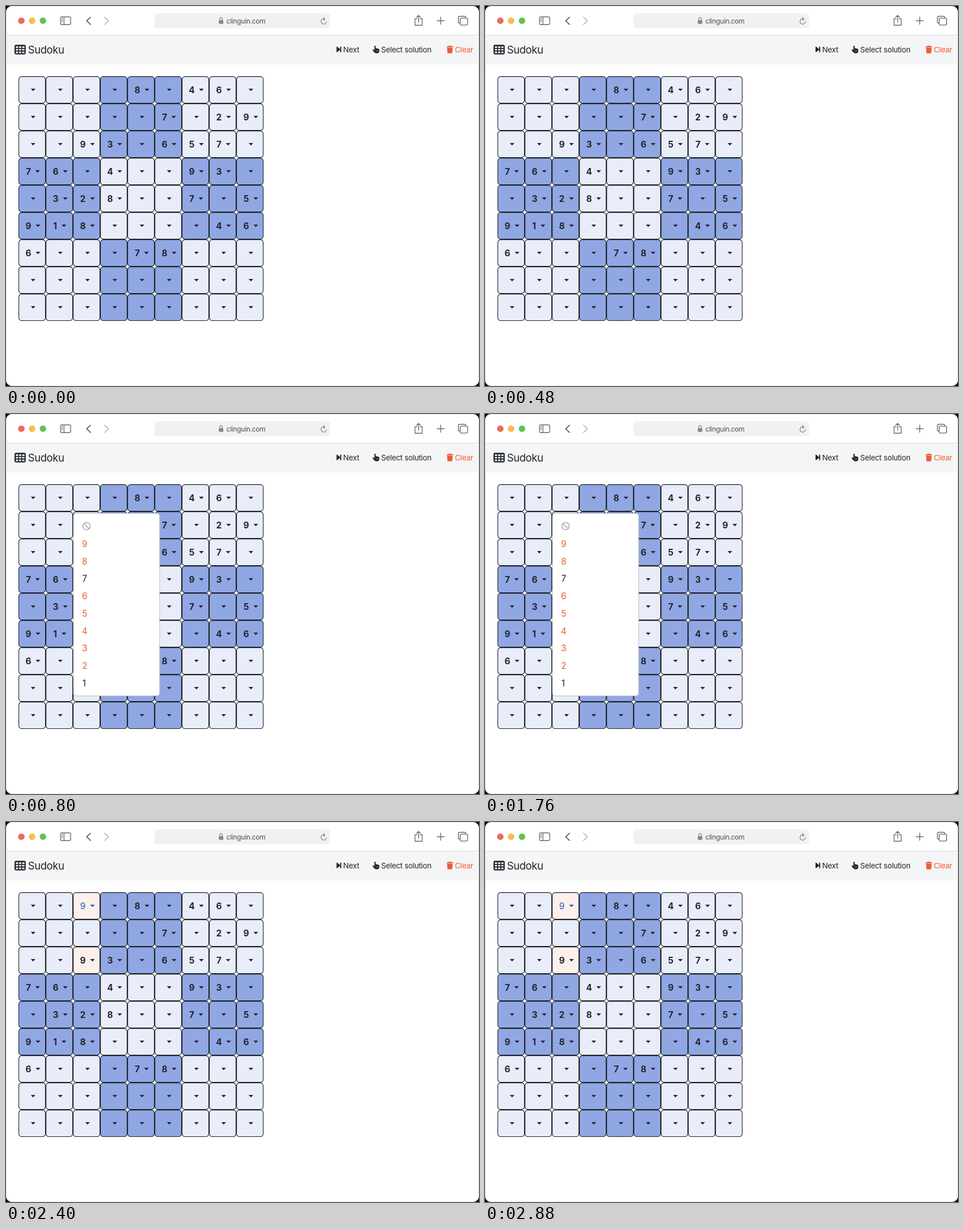
These frames come from a looping animation (834 px wide and 671 px high, 3.2 s). An HTML page:

```html
<!DOCTYPE html>
<html lang="en">
<head>
<meta charset="utf-8">
<title>Sudoku</title>
<style>
  html, body { margin: 0; width: 100%; height: 100%; overflow: hidden; background: #000; }
  svg { display: block; font-family: Inter, "Open Sans", sans-serif; fill: #212529; }
  .line { fill: none; stroke: #6b6b6b; stroke-width: 1.4; stroke-linecap: round; stroke-linejoin: round; }
  .nav { font-size: 13.3px; letter-spacing: -.25px; }
  .cell { stroke: #1b1f24; stroke-width: 1.1; }
  .digit { font-size: 15.5px; font-weight: 700; text-anchor: middle; }
  .chosen { font-weight: 400; fill: #2456c8; }
  .item { font-size: 15.3px; text-anchor: middle; }
  .red { fill: #ee5a36; }
</style>
</head>
<body>
<svg width="834" height="671" viewBox="0 0 834 671">
  <rect width="834" height="671" rx="10" fill="#d4d4d4"/>
  <rect x=".8" y=".5" width="832.4" height="670" rx="9.5" fill="#fff"/>
  <path d="M.8 51.5H833.2" stroke="#dcdddd"/>
  <path d="M.8 52H833.2V103.5H.8z" fill="#f4f5f6"/>

  <!-- browser toolbar -->
  <circle cx="27" cy="26" r="5.8" fill="#ec6a5e"/>
  <circle cx="46" cy="26" r="5.8" fill="#f4bd4f"/>
  <circle cx="65.2" cy="26" r="5.8" fill="#61c454"/>
  <g class="line">
    <rect x="96.2" y="19.2" width="17.8" height="13.6" rx="2.2"/>
    <path d="M102.4 19.2V32.8M98.4 22.3h1.8M98.4 24.8h1.8M98.4 27.3h1.8" stroke-width="1.2"/>
    <path d="M149 19.8L142.2 26.2L149 32.6" stroke="#555" stroke-width="1.6"/>
    <path d="M173.8 19.8L180.6 26.2L173.8 32.6" stroke="#b9b9b9" stroke-width="1.6"/>
    <path d="M724.5 22.5H721.2V34H733.8V22.5H730.5M727.5 28.5V16.8M724 20L727.5 16.6L731 20"/>
    <path d="M760.2 26H772.8M766.5 19.7V32.3"/>
    <path d="M800.6 30H799.6Q797.6 30 797.6 28V20.2Q797.6 18.2 799.6 18.2H808.6Q810.6 18.2 810.6 20.2V21.4"/>
    <rect x="800.8" y="21.4" width="13" height="12.2" rx="2"/>
  </g>
  <rect x="262" y="13" width="309.5" height="26.5" rx="6" fill="#f1f1f2"/>
  <rect x="375.3" y="25" width="7.8" height="6.6" rx="1" fill="#858585"/>
  <path class="line" d="M376.9 25V23Q376.9 20.4 379.2 20.4T381.5 23V25" style="stroke:#858585;stroke-width:1.2"/>
  <text x="388.6" y="30.5" font-size="12" letter-spacing="-.28" fill="#4b4b4b">clinguin.com</text>
  <path class="line" d="M562.2 23.1A4.7 4.7 0 1 0 564.8 27.3M559.8 20.5L562.4 23.1L559.8 25.5" style="stroke:#777;stroke-width:1.1"/>

  <!-- page header -->
  <rect x="15" y="68.6" width="19.8" height="16.8" rx="2.4"/>
  <path d="M17.4 71.2h4v2.8h-4zm5.6 0h4v2.8h-4zm5.6 0h4v2.8h-4zM17.4 75.8h4v2.8h-4zm5.6 0h4v2.8h-4zm5.6 0h4v2.8h-4zM17.4 80.4h4v2.8h-4zm5.6 0h4v2.8h-4zm5.6 0h4v2.8h-4z" fill="#f4f5f6"/>
  <text x="38.8" y="84" font-size="18.5" letter-spacing="-.45">Sudoku</text>
  <path d="M582.8 72.6Q582.8 71 584.1 72L589.2 76.2V72.3Q589.2 71.5 590 71.5H590.3Q591.1 71.5 591.1 72.3V81Q591.1 81.8 590.3 81.8H590Q589.2 81.8 589.2 81V77.2L584.1 81.3Q582.8 82.3 582.8 80.7z"/>
  <text class="nav" x="594.6" y="81.7">Next</text>
  <path d="M649.6 71.2Q649.6 70 650.7 70T651.8 71.2V75Q652.6 74 653.9 75Q655 74.4 656 75.6Q658.2 75.2 658.2 77.4V79.4Q658.2 83.4 654.4 83.4H652.6Q650.6 83.4 649.4 81.8L646.7 78.4Q646.2 77.4 647 76.8T648.6 77.1L649.6 78.2z"/>
  <path d="M652.2 78.2V81M654 78.2V81M655.8 78.2V81" stroke="#a5a7a9" stroke-width=".6"/>
  <text class="nav" x="661.5" y="81.7">Select solution</text>
  <path class="red" d="M776.9 71H780L780.6 70H784.6L785.2 71H788.3V72.7H776.9zM777.7 73.5H787.5L786.9 82.2Q786.8 83.4 785.6 83.4H779.6Q778.4 83.4 778.3 82.2z"/>
  <text class="nav red" x="791.6" y="81.7">Clear</text>

  <g id="board"></g>
  <g id="menu">
    <rect x="118.9" y="175.4" width="152" height="322.4" rx="5" fill="#fff" stroke="#b9bdc4"/>
    <g fill="none" stroke="#a9b0b7" stroke-width="1.7">
      <circle cx="142" cy="198" r="6.5"/>
      <path d="M137.4 193.4L146.6 202.6"/>
    </g>
  </g>
</svg>
<script>
const rows = [
  "....8.46.", ".....7.29", "..93.657.",
  "76.4..93.", ".328..7.5", "918....46",
  "6...78...", ".........", "........."
];
const board = document.getElementById("board");
const menu = document.getElementById("menu");

function add(parent, tag, attrs, text = "") {
  const el = document.createElementNS("http://www.w3.org/2000/svg", tag);
  for (const key in attrs) el.setAttribute(key, attrs[key]);
  el.textContent = text;
  parent.append(el);
}

function drawCell(row, col, digit, fill, style = "") {
  const x = 22 + col * 48, y = 124 + row * 48;
  add(board, "rect", { class: "cell", x: x + .6, y: y + .6, width: 46.9, height: 46.9, rx: 5, fill });
  let caret = 25.8;
  if (digit !== ".") {
    caret = { 1: 32.2, 7: 33.7 }[digit] || 34.5;
    add(board, "text", { class: "digit " + style, x: x + (digit === "1" ? 16.7 : 17.5), y: y + 30.1 }, digit);
  }
  add(board, "path", { class: style, d: `M${x + caret - 4.1} ${y + 22}h8.2l-4.1 4.2z` });
}

function drawBoard(conflict) {
  board.replaceChildren();
  rows.forEach((line, row) => [...line].forEach((digit, col) => {
    const shaded = (Math.floor(row / 3) + Math.floor(col / 3)) % 2;
    const chosen = conflict && row === 0 && col === 2;
    const clash = conflict && row === 2 && col === 2;
    const fill = chosen || clash ? "#fdf0eb" : shaded ? "#90a7e3" : "#e8edf9";
    drawCell(row, col, chosen ? "9" : digit, fill, chosen ? "chosen" : "");
  }));
}

for (let n = 9; n > 0; n--) {
  const allowed = n === 7 || n === 1;
  add(menu, "text", {
    class: "item" + (allowed ? "" : " red"),
    x: n === 1 ? 137.8 : 138.8, y: 234.8 + (9 - n) * 30.75
  }, n);
}

let shown;
function frame(now) {
  const t = now % 3200;
  const conflict = t >= 2400;
  menu.style.display = t >= 800 && !conflict ? "" : "none";
  if (conflict !== shown) drawBoard(shown = conflict);
  requestAnimationFrame(frame);
}
frame(0);
</script>
</body>
</html>
```
